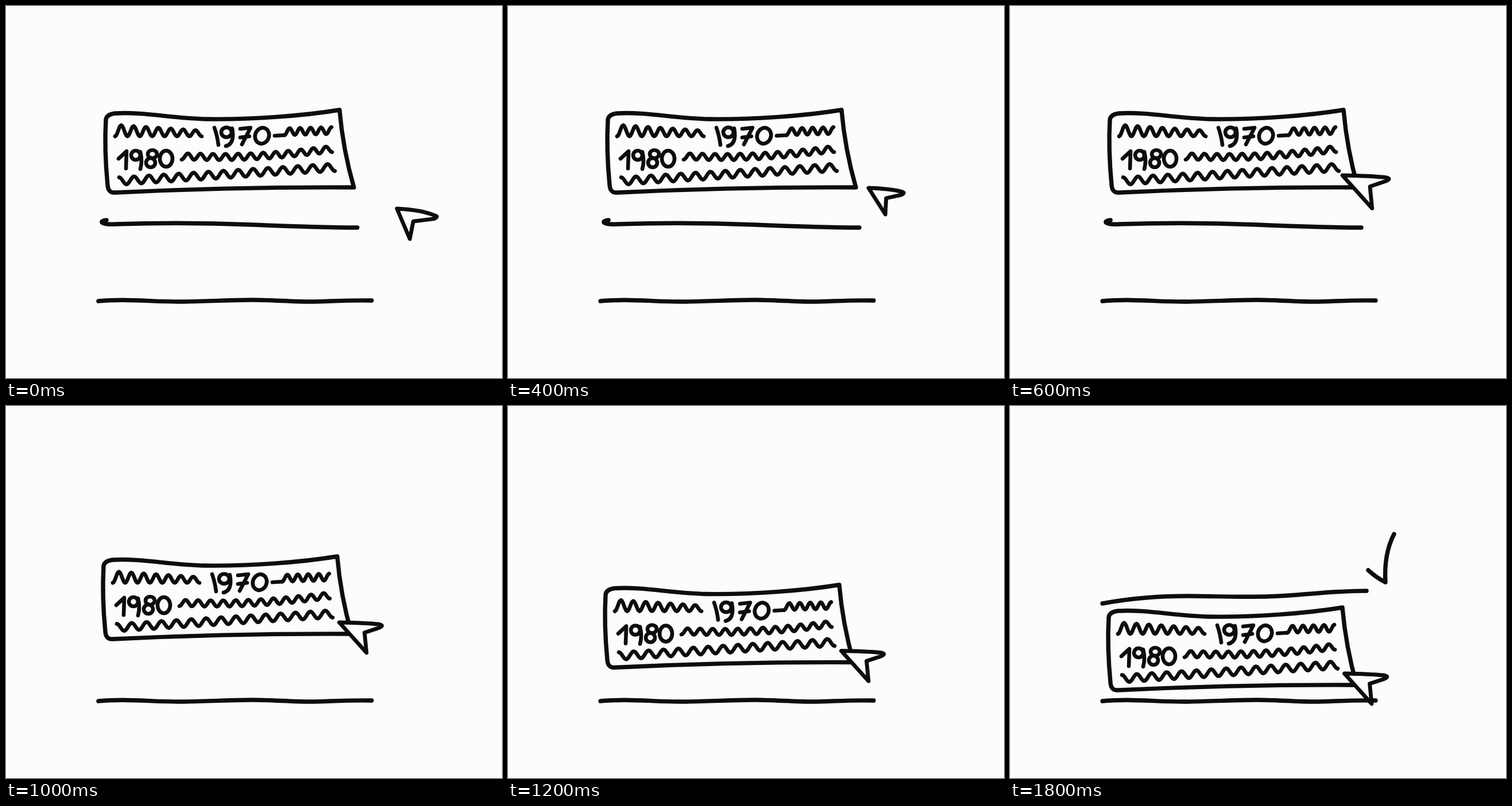
An HTML page with a canvas that plays this animation: 864x648 px, repeating every 3 s.

```html
<!DOCTYPE html>
<html lang="en">
<head>
<meta charset="utf-8">
<title>Drag and drop timeline</title>
<style>
html, body { margin: 0; width: 100%; height: 100%; overflow: hidden; background: #fcfcfa; }
canvas { display: block; width: 864px; height: 648px; }
</style>
</head>
<body>
<canvas id="stage" width="864" height="648"></canvas>
<script>
const ctx = document.getElementById('stage').getContext('2d');
const PAPER = '#fcfcfa', INK = '#0b0d10';
const LOOP = 3000, BEAT = 200;
const rad = deg => deg * Math.PI / 180;
const mix = (a, b, u) => a + (b - a) * u;
const pen = d => new Path2D(d);

// Scribbled text: a cosine along a line, sagging by `sag` in the middle
function scribble([x0, y0], [x1, y1], { turns, from, to = from, sag = 0, phase = 0 }) {
  const path = new Path2D(), steps = Math.round(turns * 12);
  for (let i = 0; i <= steps; i++) {
    const u = i / steps;
    const swing = mix(from, to, u) * Math.cos(2 * Math.PI * turns * u + phase);
    path.lineTo(mix(x0, x1, u), mix(y0, y1, u) + sag * Math.sin(Math.PI * u) + swing);
  }
  return path;
}

function oval(x, y, rx, ry, tilt = 0) {
  const path = new Path2D();
  path.ellipse(x, y, rx, ry, rad(tilt), 0, 2 * Math.PI);
  return path;
}

// Pointer with its tip at x, y; `spread` opens the lower wing
function arrow(x, y, size, spread) {
  const at = (length, deg) =>
    [x + size * length * Math.cos(rad(deg)), y + size * length * Math.sin(rad(deg))];
  const [rx, ry] = at(75, 4 + 7 * spread);
  const path = new Path2D();
  path.moveTo(x, y);
  path.quadraticCurveTo(mix(x, rx, 0.6), mix(y, ry, 0.15), rx - 5, ry - 2);
  path.quadraticCurveTo(rx + 4, ry, rx - 5, ry + 4);
  path.lineTo(...at(47.5 * (1 - 0.2 * spread), 22 + 16 * spread));
  path.lineTo(...at(71 * (1 - 0.15 * spread), 48 + 19 * spread));
  path.closePath();
  return path;
}

const card = pen('M174,198 Q175,189 190,187 C240,184 290,196 350,197 C430,198 520,191 581,181 ' +
  'Q587,250 606,316 Q400,315 190,325 Q178,326 177,312 Q171,250 174,198 Z');

const writing = [
  scribble([190, 217], [341, 222], { turns: 7, from: 10, to: 5 }),
  pen('M363,212 Q368,226 370,242'),
  oval(384, 220, 9, 8.5),
  pen('M394,213 Q399,240 383,244'),
  pen('M408,214 L426,212 L411,241 M408,229 L424,227'),
  oval(446, 226, 12, 14, 20),
  pen('M468,226 L485,225'),
  scribble([485, 219], [567, 217], { turns: 4.5, from: 6 }),

  pen('M196,266 L210,253 L209,283'),
  oval(226, 260, 8, 8),
  pen('M234,254 Q238,270 234,284'),
  oval(255, 258, 8, 7),
  oval(252, 273, 8, 8),
  oval(279, 266, 11, 14),
  scribble([306, 262], [568, 249], { turns: 12, from: 5.5, sag: 6 }),

  scribble([197, 305], [573, 281], { turns: 14.5, from: 6.5, phase: Math.PI })
];

const middleLine = pen('M175,373 Q166,374 167,377 Q172,381 190,380 Q310,376 430,381 T612,386');
const bottomLine = pen('M161,514 C210,509 260,516 310,515 S400,512 430,512 S500,515 530,515 S590,512 637,513');
const topLine = pen('M161,344 C210,335 260,331 310,331 S430,335 500,329 S580,323 621,322');
const check = pen('M624,286 Q638,299 654,307 Q651,258 669,223');

// One pose per beat: the pointer comes near, then carries the card down
const approach = [
  arrow(681, 353, 0.95, 1),
  arrow(652, 331, 1.08, 0.2),
  arrow(628, 317, 0.83, 0.5),
  arrow(579, 295, 1.09, 0)
];
const grip = arrow(584.5, 296, 1, 0);
const carry = [[-2.5, 37.5], [-4, 81], [-4, 130.5], [-2, 170]];

function stroke(path, width = 7.4) {
  ctx.lineWidth = width;
  ctx.stroke(path);
}

function draw(now) {
  const t = now % LOOP;
  const beat = Math.min(Math.floor(t / BEAT), 7);
  const held = beat >= approach.length;
  const pointer = held ? grip : approach[beat];

  ctx.fillStyle = PAPER;
  ctx.strokeStyle = INK;
  ctx.lineCap = ctx.lineJoin = 'round';
  ctx.fillRect(0, 0, 864, 648);

  stroke(bottomLine);
  if (beat < 5) stroke(middleLine);
  if (beat === 7) stroke(topLine);
  if (t >= 1800) stroke(check);

  ctx.save();
  if (held) ctx.translate(...carry[beat - approach.length]);
  stroke(card);
  for (const mark of writing) stroke(mark, 6.6);
  ctx.fill(pointer);
  stroke(pointer, 6.8);
  ctx.restore();
}

const start = performance.now();
function tick() {
  draw(performance.now() - start);
  requestAnimationFrame(tick);
}
tick();
</script>
</body>
</html>
```
